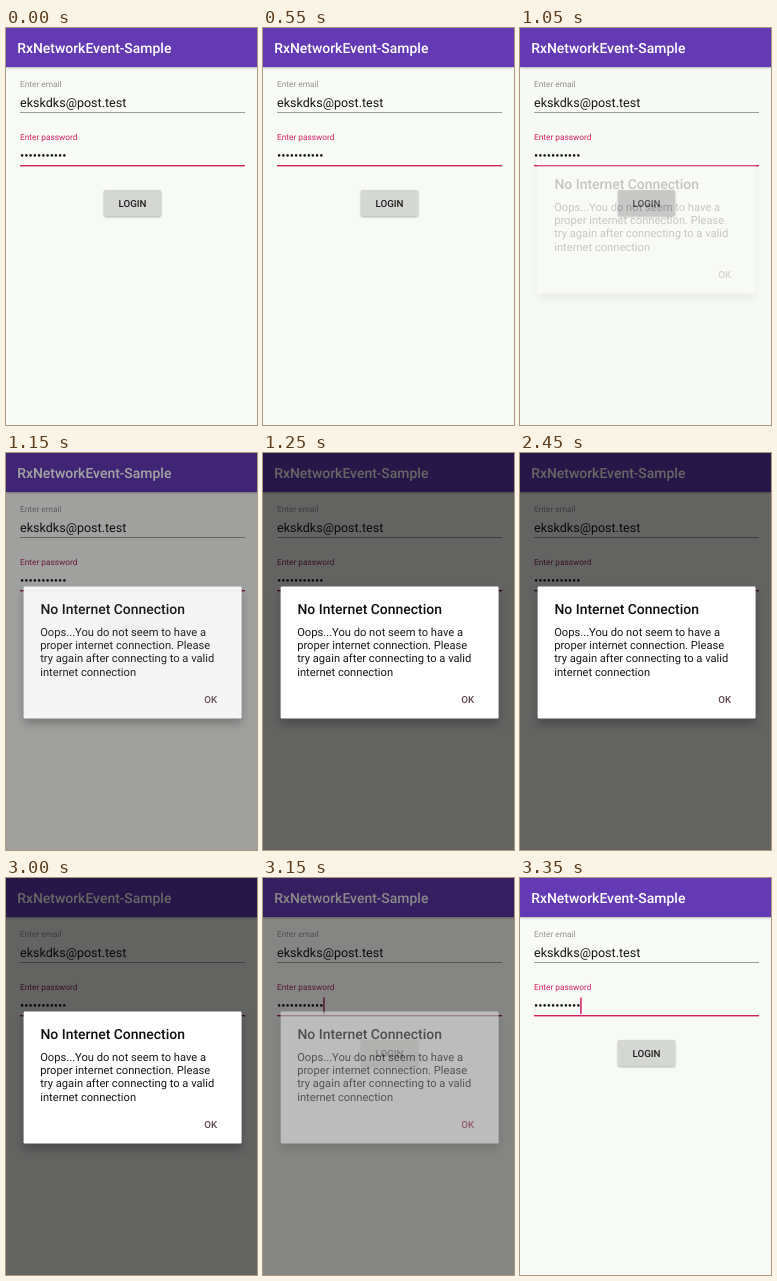
These frames come from a looping animation (251 by 397 pixels, 3400 ms). An HTML page:

```html
<!DOCTYPE html>
<html lang="en">
<head>
<meta charset="utf-8">
<title>Login dialog</title>
<style>
  html, body { margin: 0; width: 100%; height: 100%; overflow: hidden; background: #f8faf6; }
  svg {
    display: block; width: 251px; height: 397px;
    font-family: Roboto, "Noto Sans", sans-serif; text-rendering: geometricPrecision;
  }
  .title { font-size: 13.94px; font-weight: 500; }
  .label { font-size: 8.3px; }
  .field { font-size: 12.55px; fill: #141614; }
  .button { font-size: 9.76px; font-weight: 500; }
  .body { font-size: 11.16px; fill: #161616; }
  #bar { filter: drop-shadow(0 1px 1.3px rgba(0, 0, 0, .3)); }
  #login { filter: drop-shadow(0 1px .8px rgba(0, 0, 0, .3)); }
  #card { filter: drop-shadow(0 6px 4.5px rgba(0, 0, 0, .25)); }
</style>
</head>
<body>
<svg viewBox="0 0 251 397">
  <rect width="251" height="397" fill="#f8faf6"/>
  <rect id="bar" width="251" height="39" fill="#633ab4"/>
  <text class="title" x="11.2" y="25" fill="#fff">RxNetworkEvent-Sample</text>

  <text class="label" x="14" y="58.5" fill="#929492">Enter email</text>
  <text class="field" x="14" y="79">ekskdks@post.test</text>
  <rect x="14" y="84" width="225" height=".8" fill="#858785"/>

  <g id="accent">
    <text class="label" x="14" y="112">Enter password</text>
    <rect x="14" y="137" width="225" height="1.4"/>
    <rect id="cursor" x="60.2" y="119.5" width="1.5" height="16.5"/>
  </g>
  <text class="field" x="14" y="132.4">•••••••••••</text>

  <rect id="login" x="98" y="162" width="57" height="26" rx="1.4" fill="#d5d7d4"/>
  <rect id="press" x="98" y="162" width="57" height="26" rx="1.4"/>
  <text class="button" x="126.5" y="178.8" text-anchor="middle" fill="#1c1e1c">LOGIN</text>

  <rect id="dim" width="251" height="397"/>

  <g id="dialog">
    <rect id="card" x="17.6" y="133.6" width="218" height="132" rx="1.4" fill="#fff"/>
    <text class="title" x="34.4" y="161.4" fill="#0e0e0e">No Internet Connection</text>
    <g class="body">
      <text x="34.2" y="182.8">Oops...You do not seem to have a</text>
      <text x="34.2" y="196.1">proper internet connection. Please</text>
      <text x="34.2" y="209.4">try again after connecting to a valid</text>
      <text x="34.2" y="222.7">internet connection</text>
    </g>
    <text id="ok" class="button" x="198.2" y="249.5">OK</text>
  </g>
</svg>
<script>
const LOOP = 3400, OPEN = 1050, CLOSE = 3100;
const el = id => document.getElementById(id);
const ramp = (t, from, to) => Math.min(1, Math.max(0, (t - from) / (to - from)));
const mix = (a, b, k) => `rgb(${a.map((v, i) => v + (b[i] - v) * k)})`;

function draw(t) {
  const shade = ramp(t, OPEN, OPEN + 170) - ramp(t, CLOSE, CLOSE + 230);
  const shown = ramp(t, OPEN - 30, OPEN + 115) - ramp(t, CLOSE - 10, CLOSE + 100);
  const press = ramp(t, OPEN - 200, OPEN - 50) - ramp(t, OPEN + 50, OPEN + 250);
  const blink = (t >= 50 && t < 550) || t >= CLOSE;

  el('dim').style.opacity = .6 * shade;
  el('dialog').style.opacity = shown;
  el('press').style.opacity = .13 * press;
  el('cursor').style.opacity = blink ? 1 : 0;
  el('accent').style.fill = mix([210, 31, 98], [130, 45, 75], shade);
  el('ok').style.fill = mix([92, 70, 76], [176, 40, 80], ramp(t, CLOSE - 100, CLOSE));
}

function tick() {
  draw(performance.now() % LOOP);
  requestAnimationFrame(tick);
}
tick();
</script>
</body>
</html>
```
